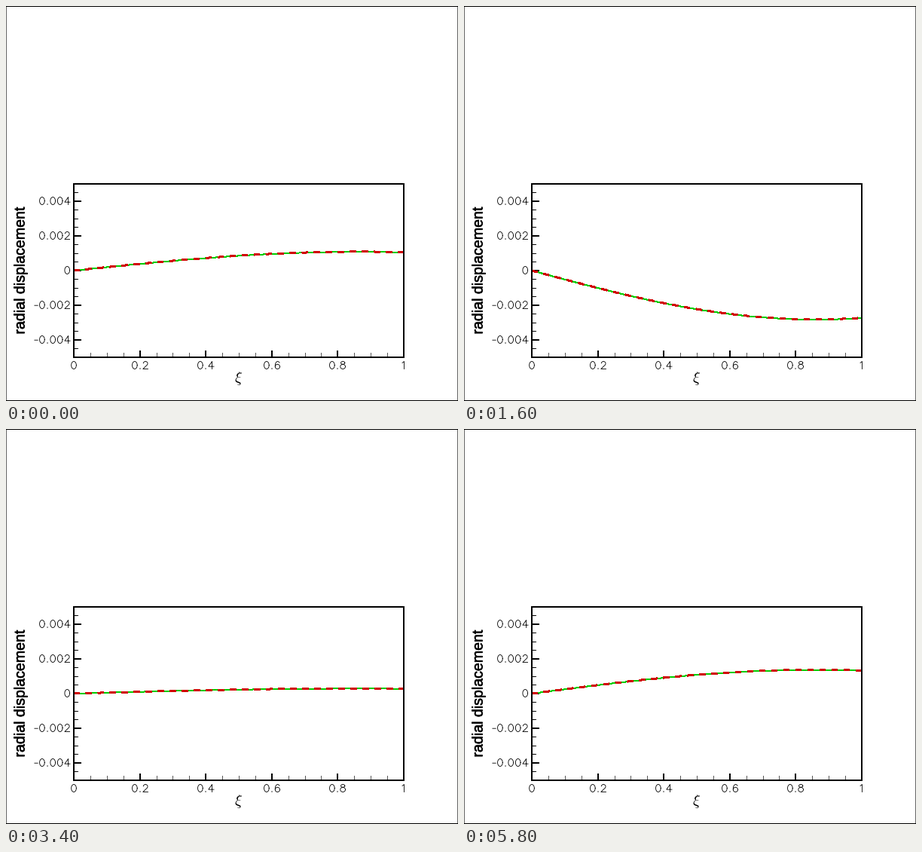
Animation of 600x524 px, one loop 6000 ms. Source, as a matplotlib script:

```python
import numpy as np
import matplotlib.pyplot as plt
from matplotlib.animation import FuncAnimation
from matplotlib.patches import Rectangle
from matplotlib.patheffects import withStroke

W, H, DPI = 600, 524, 100
PT = 72 / DPI                              # points per pixel
L, R, T, B = 90, 528, 236, 466             # plot box
ZERO = (T + B) / 2

plt.rcParams["mathtext.fontset"] = "cm"
fig = plt.figure(figsize=(W / DPI, H / DPI), dpi=DPI, facecolor="white")
ax = fig.add_axes([0, 0, 1, 1])
ax.set(xlim=(0, W), ylim=(H, 0))
ax.axis("off")


def bar(x, y, w, h, color="black", z=1):
    ax.add_patch(Rectangle((x, y), w, h, fc=color, lw=0, zorder=z))


def line(xs, ys, width, color="black", **kw):
    return ax.plot(xs, ys, color=color, lw=width * PT, snap=False, **kw)[0]


def arc(cx, cy, rx, ry, start=0, stop=360):
    a = np.radians(np.linspace(start, stop, 25))
    return [*zip(cx + rx * np.cos(a), cy + ry * np.sin(a))]


# Thin stroke glyphs on a cap height of 21 units
GLYPHS = {
    "0": [arc(10, 10.5, 7, 10.5)],
    "1": [[(6, 17), (11, 21), (11, 0)]],
    "2": [arc(10, 15, 6, 6, 170, -35) + [(3, 0), (17, 0)]],
    "4": [[(13, 0), (13, 21), (3, 7), (18, 7)]],
    "6": [arc(10.5, 6.5, 6.5, 6.5), arc(11, 9, 7, 12, 45, 190)],
    "8": [arc(10, 17, 5.5, 4), arc(10, 6.5, 7, 6.5)],
    ".": [[(4, 1), (6, 1)]],
    "-": [[(3, 9), (12, 9)]],
}
ADVANCE = {".": 10, "-": 14}
UNIT = 10 / 21


def label(text, x, base, align):
    """Draw stroke text; align is the fraction of its width left of x."""
    steps = [ADVANCE.get(c, 20) * UNIT for c in text]
    x -= align * sum(steps)
    for c, step in zip(text, steps):
        for stroke in GLYPHS[c]:
            p = np.array(stroke) * UNIT
            line(x + p[:, 0], base - p[:, 1], 0.85)
        x += step


def frame(x0, y0, x1, y1, t, sides="black", z=1):
    for x in (x0, x1 - t):
        bar(x, y0, t, y1 - y0, sides, z)
    for y in (y0, y1 - t):
        bar(x0, y, x1 - x0, t, "black", z)


frame(0, 0, W, H, 1, sides="#666666")
frame(L - 1, T - 1, R + 1, B + 1, 2, z=5)

# Ticks: every fourth one is long, thick and labelled
for k in range(-9, 10):
    y = ZERO - 11.5 * k
    if k % 4:
        bar(L, int(y), 6, 1)
    else:
        bar(L, y - 1, 10, 2)
        label(f"{k * 0.0005:.3f}" if k else "0", 86, y + 4.5, 1)
for k in range(21):
    x = round(L + (R - L) * k / 20)
    if k % 4:
        bar(x, B - 6, 1, 6, "#555555")
    else:
        bar(x - 1, B - 9, 2, 9)
        label(f"{k / 20:g}", x, 481.5, 0.5)

ax.text(24.5, 435.5, "radial displacement", family="Liberation Sans",
        size=19.6 * PT, rotation=90, rotation_mode="anchor",
        ha="left", va="baseline",
        path_effects=[withStroke(linewidth=0.4, foreground="black")])
ax.text(308.5, 499.4, r"$\xi$", size=20 * PT, ha="center", va="baseline")

# Curves: one standing wave, drawn solid and dashed
u = np.linspace(0, 1, 41)
px = L + (R - L) * u
solid = line(px, px, 1, "#00cc00", zorder=3, antialiased=False)
dashed = line(px, px, 2, "#d00000", zorder=4, antialiased=False,
              dash_capstyle="butt")
dashed.set_dashes([8 / 2, 8.7 / 2])


def draw(n):
    swing = -67 * np.cos(np.radians(12.2 * (n - 9.16)))
    y = ZERO - swing * np.sin(1.82 * u)
    solid.set_ydata(y)
    dashed.set_ydata(y - 0.3 * u)
    return solid, dashed


anim = FuncAnimation(fig, draw, frames=30, interval=200, repeat=True,
                     repeat_delay=0)
plt.show()
```
